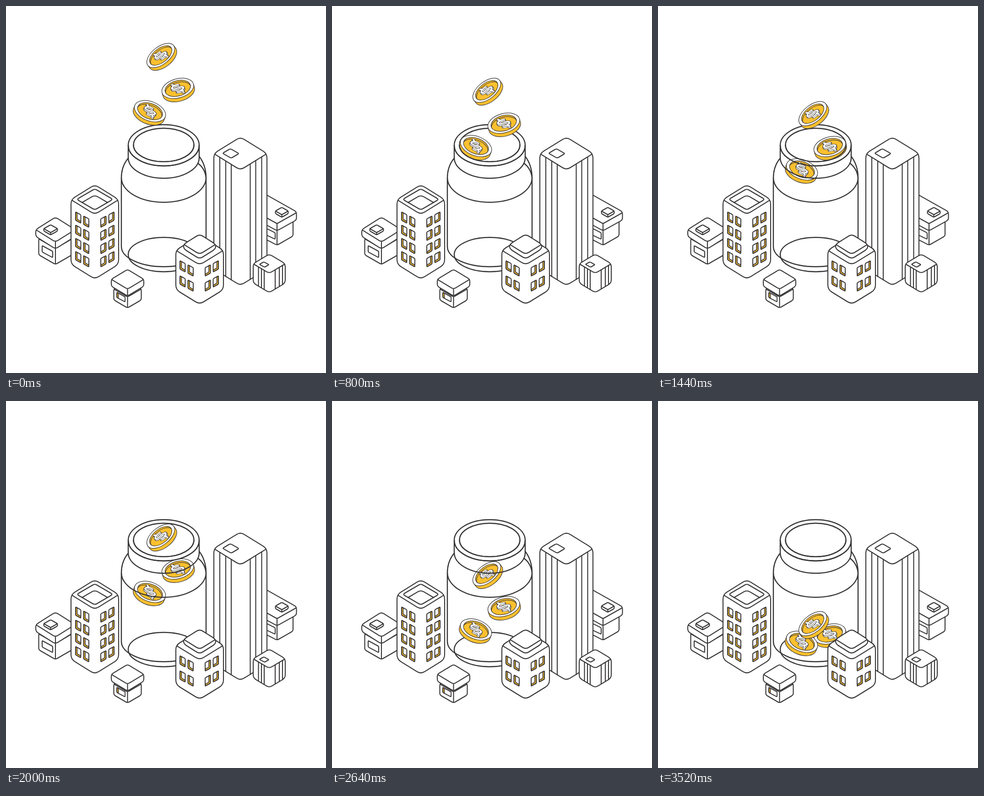
Write an HTML page that moves like this. It is 699 px wide and 801 px high and loops after 3.6 s.

```html
<!DOCTYPE html>
<html lang="en">
<head>
<meta charset="utf-8">
<title>Savings jar</title>
<style>
  html, body { margin: 0; width: 100%; height: 100%; overflow: hidden; background: #fff; }
  svg { display: block; }
  path, ellipse { stroke: #373536; stroke-width: 2.1; stroke-linecap: round; stroke-linejoin: round; fill: none; }
  .white { fill: #fff; }
  .gold { fill: #fcc02e; }
  .jar * { stroke-width: 2.4; }
  .thin { stroke-width: 1.7; }
  .coin * { stroke-width: 1.2; }
  .coin .ink { stroke-width: 7.2; }
  .coin .chalk { stroke: #fff; stroke-width: 4.6; }
</style>
</head>
<body>
<svg id="stage" width="699" height="801" viewBox="0 0 699 801"></svg>
<script>
const GOLD = 'gold', WHITE = 'white';
const path = (d, cls = '') => `<path class="${cls}" d="${d}"/>`;
const ellipse = (x, y, rx, ry, cls = '') =>
  `<ellipse class="${cls}" cx="${x}" cy="${y}" rx="${rx}" ry="${ry}"/>`;

// Polyline or polygon with softened corners; pts is a flat list x, y, x, y ...
function soft(pts, r, closed, cls) {
  const p = [];
  for (let i = 0; i < pts.length; i += 2) p.push([pts[i], pts[i + 1]]);
  const n = p.length;
  const toward = (a, b) => {
    const len = Math.hypot(b[0] - a[0], b[1] - a[1]);
    const k = Math.min(r / len, 0.5);
    return [a[0] + (b[0] - a[0]) * k, a[1] + (b[1] - a[1]) * k];
  };
  let d = '';
  p.forEach((c, i) => {
    if (!closed && (i === 0 || i === n - 1)) { d += (i ? 'L' : 'M') + c; return; }
    d += `${d ? 'L' : 'M'}${toward(c, p[(i + n - 1) % n])}Q${c} ${toward(c, p[(i + 1) % n])}`;
  });
  return path(d + (closed ? 'Z' : ''), cls);
}
const poly = (pts, r = 2, cls = WHITE) => soft(pts, r, true, cls);
const line = (pts, r = 2, cls = '') => soft(pts, r, false, cls);

// Isometric block: x and y of the back corner, half width, half depth, height
function box(x, y, w, k, h, r = 4, edge = true) {
  const l = x - w, q = x + w, m = y + k, v = y + 2 * k;
  return poly([l, m, x, y, q, m, q, m + h, x, v + h, l, m + h], r) +
    line([l + r / 5, m + r / 7, x, v, q - r / 5, m + r / 7], r) +
    (edge ? path(`M${x} ${v}V${v + h - 1}`) : '');
}

const stripes = (x, v, h, slope, offsets) => offsets.map(o =>
  path(`M${x + o} ${v - Math.abs(o) * slope}v${h}`)).join('');

const pane = (x, y) =>
  poly([x, y, x + 11.3, y + 6.3, x + 11.3, y + 24.4, x, y + 18], 1.5, GOLD) +
  poly([x + 3.4, y + 1.9, x + 11.3, y + 6.3, x + 11.3, y + 20.4, x + 3.4, y + 15.8], 1, WHITE + ' thin');

function windows(x, y, rows, pitch) {
  let half = '';
  for (let i = 0; i < rows; i++) half += pane(-42, y + i * pitch) + pane(-24.5, y + 9 + i * pitch);
  return [1, -1].map(s => `<g transform="translate(${x}) scale(${s} 1)">${half}</g>`).join('');
}

const rightHouse =
  poly([540, 460, 592, 488, 627, 468, 627, 502, 592, 522, 540, 495], 4) +
  path('M592 489V521') +
  poly([552, 477, 588, 495, 588, 509, 552, 492]) +
  poly([540, 396, 634.5, 449, 634.5, 467, 592, 490.5, 540, 462], 5) +
  line([540, 446, 592, 475, 633, 452], 3) +
  path('M592 475V490') +
  box(602.5, 439.5, 14, 8, 5.5, 2);

const tower = box(512, 286, 58, 36, 252, 10, false) +
  stripes(512, 358, 252, 0.61, [-45, -32, -20, 21.5, 33.5, 46.5]) +
  poly([473, 321.5, 490, 311.5, 509, 322, 492, 332], 3);

const cube = box(575, 541.5, 35, 21, 42, 7, false) +
  stripes(575, 584, 41, 0.6, [-23.5, -17, -11, 13, 22, 29]) +
  poly([553.5, 564, 563, 558.5, 574.5, 564.5, 565, 570]);

const leftHouse = box(108, 487, 36.5, 21, 35) +
  poly([79, 523, 102, 535.5, 102, 549, 79, 537]) +
  box(108, 461, 43, 27, 15, 6) +
  box(97.5, 477.5, 15, 8.5, 5, 2);

const flats = box(194, 390, 52, 32.5, 141, 10, false) +
  poly([154.5, 422, 194, 399, 233.5, 422, 194, 445], 5) +
  line([166, 429, 194, 412.5, 222, 429], 8) +
  windows(194, 449.5, 4, 28.8);

const office = box(423, 501, 52, 32, 86, 10, false) +
  box(423, 498, 35, 22, 10, 8, false) +
  windows(422, 556, 2, 33);

const hut = box(265.5, 600, 30, 17.5, 24, 4) +
  poly([242, 625, 260, 635, 260, 645.5, 242, 636], 1.5, GOLD) +
  poly([245.5, 627, 260, 635, 260, 645.5, 245.5, 638], 1, WHITE + ' thin') +
  box(265.5, 575, 35.5, 21.5, 15, 5);

const jarBack = ellipse(344.5, 304, 77.5, 45) + ellipse(344.5, 303.3, 66, 36.6) +
  ellipse(344.5, 542.5, 77.5, 37.5) +
  path('M419 343Q434 354 437 374');

const jarFront =
  path('M267 304A77.5 45 0 0 0 422 304') +
  path('M278.5 303.3A66 36.6 0 0 0 410.5 303.3') +
  path('M267 304V331A77.5 45 0 0 0 422 331V304') +
  path('M252 375A92.5 53.5 0 0 0 437 375') +
  path('M267 332Q252 350 252 375V525A92.5 44 0 0 0 437 525V375Q437 348 422 328');

const sign = 'M8-8C6-14-9-15-9-7C-9 1 9-1 9 7C9 15-6 14-8 8M0-20V-13M0 13V20';

function coin(x, y, tilt, b) {
  const a = 35.6, s = b / a, ia = 28.5, ib = ia * s;
  const glyph = cls => [3, 0].map(o =>
    `<g transform="translate(0 ${o - 1}) scale(1 ${s}) rotate(-30)">${path(sign, cls)}</g>`);
  const [lowInk, topInk] = glyph('ink'), [lowChalk, topChalk] = glyph('chalk');
  return `<g class="coin"><g transform="translate(${x} ${y}) rotate(${tilt})">` +
    path(`M${-a} 0v7.6A${a} ${b} 0 0 0 ${a} 7.6V0Z`, GOLD) +
    ellipse(0, 0, a, b, WHITE) + ellipse(0, 0, ia, ib, GOLD) +
    path(`M${-ia * 0.994} 1.8A${ia} ${ib} 0 0 1 ${ia * 0.994} 1.8`) +
    lowInk + lowChalk + topInk + topChalk + '</g></g>';
}

const stage = document.getElementById('stage');
stage.innerHTML = rightHouse + tower + cube + leftHouse + flats +
  `<g class="jar">${jarBack}</g>` +
  coin(375.2, 179.8, -15.5, 20.9) + coin(314.6, 229.6, 20.7, 21) + coin(338, 108, -38, 19.2) +
  `<g class="jar">${jarFront}</g>` + office + hut;

// Fall distance as [step, pixels]; all coins share the fall, then land one by one
const fall = [[0, 0], [5, 53], [7, 76], [11, 110], [13, 127], [16, 157], [18, 187], [24, 269]];
const tracks = [
  [...fall, [27, 311], [28, 320], [30, 328], [33, 329]],
  [...fall, [26, 292], [27, 296], [33, 296]],
  [...fall, [28, 327], [31, 369], [32, 378], [33, 380]],
];
const coins = stage.querySelectorAll('.coin');

function at(track, n) {
  const i = track.findIndex(k => k[0] > n);
  const [n0, d0] = track[i - 1], [n1, d1] = track[i];
  return d0 + (d1 - d0) * (n - n0) / (n1 - n0);
}

function draw() {
  // 33 poses per 3.6 s loop, shown on a 40 ms clock
  const tick = Math.floor((performance.now() % 3600) / 40);
  const step = Math.floor(tick * 11 / 30);
  coins.forEach((c, i) => c.setAttribute('transform', `translate(0 ${at(tracks[i], step)})`));
  requestAnimationFrame(draw);
}
draw();
</script>
</body>
</html>
```
